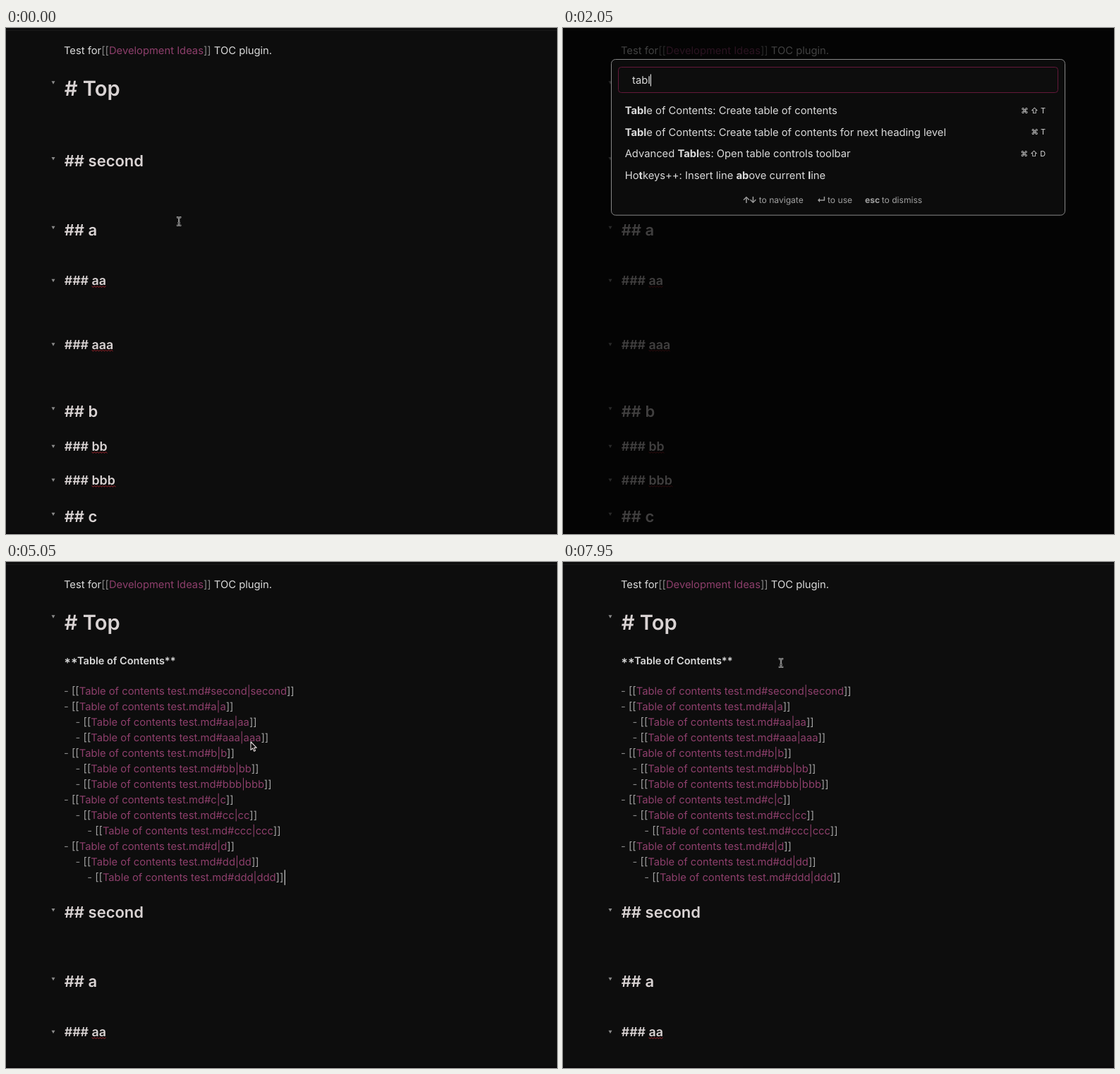
An HTML page that plays this animation: 781 px wide and 717 px high, repeating every 8 s.

```html
<!DOCTYPE html>
<html lang="en">
<head>
<meta charset="utf-8">
<title>Table of contents demo</title>
<style>
  html, body { margin: 0; width: 100%; height: 100%; overflow: hidden; background: #0d0d0d; }
  svg { display: block; width: 781px; height: 717px; }
  text { font-family: Inter, "Noto Sans", "DejaVu Sans", sans-serif; white-space: pre; fill: #dadada; text-rendering: geometricPrecision; }
  .head { fill: #d9d3d3; }
  .dim { fill: #868686; }
  .link { fill: #8e3f6c; }
  .gold { fill: #d9a13f; text-decoration: underline; }
  .note { fill: #a0a0a0; }
</style>
</head>
<body>
<svg id="stage" viewBox="0 0 781 717">
  <rect width="781" height="717" fill="#0d0d0d"/>
  <rect y="3" width="781" height="1" fill="#191919"/>
  <rect y="715.5" width="781" height="1.5" fill="#070407"/>
  <g id="plain"></g>
  <g id="toc"></g>
  <g id="preview"></g>
  <rect id="caret" width="1.2" height="21.5" fill="#d0d0d0"/>
  <rect id="shade" width="781" height="717" fill="#000" fill-opacity=".7"/>
  <g id="modal"></g>
  <g id="cursor">
    <g id="ibeam" fill="none">
      <path d="M-3.2-5.8Q-.5-5.8 0-4.6Q.5-5.8 3.2-5.8M0-4.6V4.6M-3.2 5.8Q-.5 5.8 0 4.6Q.5 5.8 3.2 5.8M-1.5 2.2H1.5" stroke="#dcdcdc" stroke-width="2.2"/>
      <path d="M-3-5.8Q-.5-5.8 0-4.6Q.5-5.8 3-5.8M0-4.6V4.6M-3 5.8Q-.5 5.8 0 4.6Q.5 5.8 3 5.8M-1.3 2.2H1.3" stroke="#111" stroke-width=".8"/>
    </g>
    <path id="arrow" d="M0 0V11.6L2.7 9.1L4.6 13.4L6.5 12.6L4.7 8.4H8.2Z" fill="#0a0505" stroke="#e6dede" stroke-width="1.1" stroke-linejoin="round"/>
    <path id="hand" d="M-1.2 1Q0-.6 1.2 1V5.2L6 6.2Q7.4 6.8 7 8.4L6 13H-.2L-3.6 8.6Q-4 6.8-2.2 7.2L-1.2 8Z" fill="#f0f0f0" stroke="#111" stroke-width=".8" stroke-linejoin="round"/>
  </g>
</svg>
<script>
const LOOP = 8000;
const BODY = 14.75;
const STRONG = 14.5;
const $ = id => document.getElementById(id);

const span = (cls, s, weight = '') =>
  `<tspan class="${cls}"${weight && ` font-weight="${weight}"`}>${s}</tspan>`;

// Places a line by the middle of its capitals.
const line = (x, mid, s, { size = BODY, weight = 400, cls = '', anchor = 'start' } = {}) =>
  `<text x="${x}" y="${mid + size * 0.364}" font-size="${size}" font-weight="${weight}" class="${cls}" text-anchor="${anchor}">${s}</text>`;

const fold = (x, y, w, h, color) =>
  `<path d="M${x - w / 2} ${y - h / 2}h${w}l${-w / 2} ${h}z" fill="${color}"/>`;

function squiggle(x, y, width) {
  let d = `M${x} ${y}`;
  for (let i = 0; i < width / 2; i++) d += `l2 ${i % 2 ? -1.6 : 1.6}`;
  return `<path d="${d}" fill="none" stroke="#a3242c" stroke-width="1"/>`;
}

// Editor view
const HEAD = {
  1: { size: 29.2, foldUp: 8 },
  2: { size: 22, foldUp: 3 },
  3: { size: 17.8, foldUp: 0 }
};
const SECTIONS = [
  [2, 'second', 188.3], [2, 'a', 286], [3, 'aa', 358, 20], [3, 'aaa', 448.5, 30],
  [2, 'b', 542.5], [3, 'bb', 593, 22], [3, 'bbb', 640.8, 33], [2, 'c', 692]
];
const ENTRIES = ['second', 'a', ' aa', ' aaa', 'b', ' bb', ' bbb', 'c', ' cc', '  ccc', 'd', ' dd', '  ddd']
  .map(s => ({ name: s.trim(), level: s.length - s.trim().length }));

const editorHead = (level, name, y, wave) => {
  const { size, foldUp } = HEAD[level];
  return fold(67, y - foldUp, 5, 4.4, '#8a8a8a') +
    line(82.7, y, '#'.repeat(level) + ' ' + name, { size, weight: 600, cls: 'head' }) +
    (wave ? squiggle(121.5, y + 7.8, wave) : '');
};

const editor = shift =>
  line(82, 31.5, 'Test for' + span('dim', '[[') + span('link', 'Development Ideas') + span('dim', ']]') + ' TOC plugin.') +
  editorHead(1, 'Top', 85.5) +
  SECTIONS.filter(s => s[2] + shift < 740)
    .map(([level, name, y, wave]) => editorHead(level, name, y + shift, wave)).join('');

const tocRows = ENTRIES.map(({ name, level }, i) =>
  line(82 + 16.6 * level, 182.6 + 22.04 * i,
    span('dim', '- ') + span('note', '[[') +
    span('link', `Table of contents test.md#${name}|${name}`) + span('note', ']]'))).join('');

$('plain').innerHTML = editor(0);
$('toc').innerHTML = editor(308) +
  line(82.3, 139.5, '**Table of Contents**', { size: STRONG, weight: 600 }) + tocRows;

// Reading view
const readHead = (name, y, size, rule) =>
  fold(49, y - 0.5, 8, 6, '#757575') +
  line(63, y, name, { size, weight: 700, cls: 'head' }) +
  (rule ? `<rect x="64" y="${rule}" width="643" height="1" fill="#393939"/>` : '');

$('preview').innerHTML =
  line(64, 47, 'Test for' + span('gold', 'Development Ideas') + ' TOC plugin.') +
  readHead('Top', 91, 32) +
  line(64, 138.2, 'Table of Contents', { size: STRONG, weight: 700 }) +
  ENTRIES.map(({ name, level }, i) => {
    const x = 14.65 * level, y = 182 + 21.47 * i;
    return `<circle cx="${66 + x}" cy="${y + 0.3}" r="2.4" fill="#d6d6d6"/>` +
      line(78.7 + x, y, name, { cls: 'gold' });
  }).join('') +
  readHead('second', 487, 24.3, 508) + readHead('a', 546.3, 24.3, 567.7) +
  readHead('aa', 603.8, 20.5) + readHead('aaa', 651, 20.5) + readHead('b', 699.6, 24.3);

// Command palette: *bold* marks matched letters, a bar precedes the shortcut
const RESULTS = {
  '': ['Export to PDF...|⌘ P', 'Search current file|⌘ F', 'Search & replace in current file|⌘ ⌥ F',
    'Open settings|⌘ ,', 'Create new note|⌘ N', 'Open graph view|⌘ G', 'Navigate back', 'Navigate forward',
    'Close active pane|⌘ W', 'Delete current file', 'Focus on last note in the sidebar',
    'Split vertically', 'Advanced Tables: Move the current table column to the right',
    'Advanced Tables: Open table controls toolbar|⌘ ⇧ D', 'Emoji Toolbar: Open emoji picker|⌘ ⇧ E'],
  t: ['*T*oggle pin', '*T*oggle left sidebar', "*T*oggle right sidebar|⌘ '", '*T*oggle checklist status|⌘ Enter',
    '*T*oggle edit/preview mode|⌘ E', '*T*oggle default view mode', '*T*oggle bold for selection|⌘ B',
    '*T*oggle italics for selection|⌘ I', '*T*oggle highlight for selection|⌘ H', '*T*oggle fold on the current line',
    '*T*able of Contents: Create table of contents|⌘ ⇧ T',
    '*T*able of Contents: Create table of contents for next heading level|⌘ T',
    'Emoji *T*oolbar: Open emoji picker|⌘ ⇧ E', 'Advanced *T*ables: Open table controls toolbar|⌘ ⇧ D',
    'S*t*art presentation'],
  tabl: ['*Tabl*e of Contents: Create table of contents|⌘ ⇧ T',
    '*Tabl*e of Contents: Create table of contents for next heading level|⌘ T',
    'Advanced *Tabl*es: Open table controls toolbar|⌘ ⇧ D', 'Ho*t*keys++: Insert line *ab*ove current *l*ine']
};
RESULTS.tab = RESULTS.tabl.map(s => s.replace('*Tabl*', '*Tab*l').replace('*l*ine', 'line'))
  .concat('*T*oggle *b*old for selection|⌘ B');
RESULTS.ta = RESULTS.tab.slice(0, 3).map(s => s.replace('*Tab*', '*Ta*b'))
  .concat('S*ta*rt presentation', '*T*oggle left sideb*a*r', "*T*oggle right sideb*a*r|⌘ '",
    '*T*oggle checklist st*a*tus|⌘ Enter', '*T*oggle it*a*lics for selection|⌘ I');

const safe = s => s.replace(/&/g, '&amp;');
const marked = s => safe(s).split('*').map((p, i) => i % 2 ? span('', p, 700) : p).join('');
const box = (x, y, w, h, r, fill, stroke) =>
  `<rect x="${x}" y="${y}" width="${w}" height="${h}" rx="${r}" fill="${fill}" stroke="${stroke}"/>`;

function palette(query, focused) {
  const rows = RESULTS[query], full = rows.length > 10;
  const top = full ? 115 : 116.6, step = full ? 30.64 : 30.67;
  const foot = full ? 573 : top + step * (rows.length - 1) + 34.6;
  const right = full ? 675 : 684;
  const hint = { size: 12.1, cls: 'note' }, key = { size: 12.5, weight: 700, cls: 'note', anchor: 'middle' };
  return box(68.5, 44.5, 643, foot + 22 - 44.5, 6, '#0c0c0c', '#878787') +
    box(78.5, 55.5, 623, full ? 35 : 36, 4, '#0d0d0d', focused ? '#64183a' : '#5c5c5c') +
    line(98, 73.8, query || 'Type a command...', { cls: query ? '' : 'dim' }) +
    rows.map((row, i) => {
      const [name, keys] = row.split('|'), y = top + step * i;
      return line(87.7, y, marked(name)) +
        (keys ? line(right, y + 0.2, keys, { size: 10.8, anchor: 'end' }) : '');
    }).join('') +
    (full ? '<rect x="693" y="91" width="9" height="462" fill="#191919"/><rect x="693" y="91" width="9" height="99" rx="4" fill="#303030"/>' : '') +
    line(260, foot, '↑', key) + line(269.5, foot, '↓', key) + line(277.7, foot, 'to navigate', hint) +
    line(366, foot, '↵', key) + line(375, foot, 'to use', hint) +
    line(428, foot, 'esc', { ...hint, weight: 700 }) + line(451.7, foot, 'to dismiss', hint) +
    '<rect id="inputCaret" y="65.5" width="1.2" height="17" fill="#dcdcdc"/>';
}

// Timeline
const OPEN = 1150, CLOSE = 3550, READ = 5400, EDIT = 7350;
const TYPED = [[OPEN, ''], [1650, 't'], [1850, 'ta'], [1950, 'tab'], [2050, 'tabl']];
const PATH = [
  [0, 245, 275], [150, 258, 120], [250, 231, 150], [2750, 231, 150], [3250, 257, 116], [4050, 257, 116],
  [4450, 225, 205], [4850, 342, 244], [5050, 347, 255], [5400, 338, 165], [5750, 305, 136], [5850, 274.5, 129],
  [6050, 145, 178], [6450, 128, 405], [6700, 126, 420], [7000, 165, 300], [7100, 245, 250], [7200, 340, 230],
  [7350, 338, 212], [7700, 315, 155], [7950, 309, 143], [LOOP, 309, 143]
];

const within = (t, a, b) => t >= a && t < b;
const show = (el, on) => { el.style.display = on ? '' : 'none'; };
const blink = (t, start) => Math.floor((t - start) / 530) % 2 === 0;

function place(t) {
  const i = Math.max(1, PATH.findIndex(p => p[0] > t));
  const [t0, x0, y0] = PATH[i - 1], [t1, x1, y1] = PATH[i];
  const k = (t - t0) / (t1 - t0);
  return [x0 + (x1 - x0) * k, y0 + (y1 - y0) * k];
}

function cursorKind(t) {
  if (within(t, 950, 2750)) return '';
  if (within(t, 2750, CLOSE)) return 'hand';
  return within(t, 4450, EDIT) ? 'arrow' : 'ibeam';
}

let shown = '';
function drawPalette(t) {
  const open = within(t, OPEN, CLOSE);
  show($('shade'), open);
  show($('modal'), open);
  if (!open) return;
  const query = TYPED.filter(s => s[0] <= t).pop()[1], focused = t < 3300;
  const state = query + focused;
  if (state !== shown) {
    $('modal').innerHTML = palette(query, focused);
    const width = query ? $('modal').querySelector('text').getComputedTextLength() : 0;
    $('inputCaret').setAttribute('x', 98 + width);
    shown = state;
  }
  show($('inputCaret'), t < 2250 || within(t, 2750, 3250));
}

function draw(t) {
  const reading = within(t, READ, EDIT);
  show($('plain'), t < CLOSE);
  show($('toc'), t >= CLOSE && !reading);
  show($('preview'), reading);

  const early = t < CLOSE;
  const caretOn = early ? within(t, 200, 400) || within(t, 950, OPEN)
    : !reading && blink(t, t < READ ? CLOSE : EDIT);
  show($('caret'), caretOn);
  $('caret').setAttribute('x', early ? 82 : 394.6);
  $('caret').setAttribute('y', early ? 129 : 436.3);

  drawPalette(t);

  const kind = cursorKind(t);
  for (const id of ['ibeam', 'arrow', 'hand']) show($(id), id === kind);
  $('cursor').setAttribute('transform', `translate(${place(t)})`);
}

const start = performance.now();
function tick() {
  draw((performance.now() - start) % LOOP);
  requestAnimationFrame(tick);
}
tick();
</script>
</body>
</html>
```
